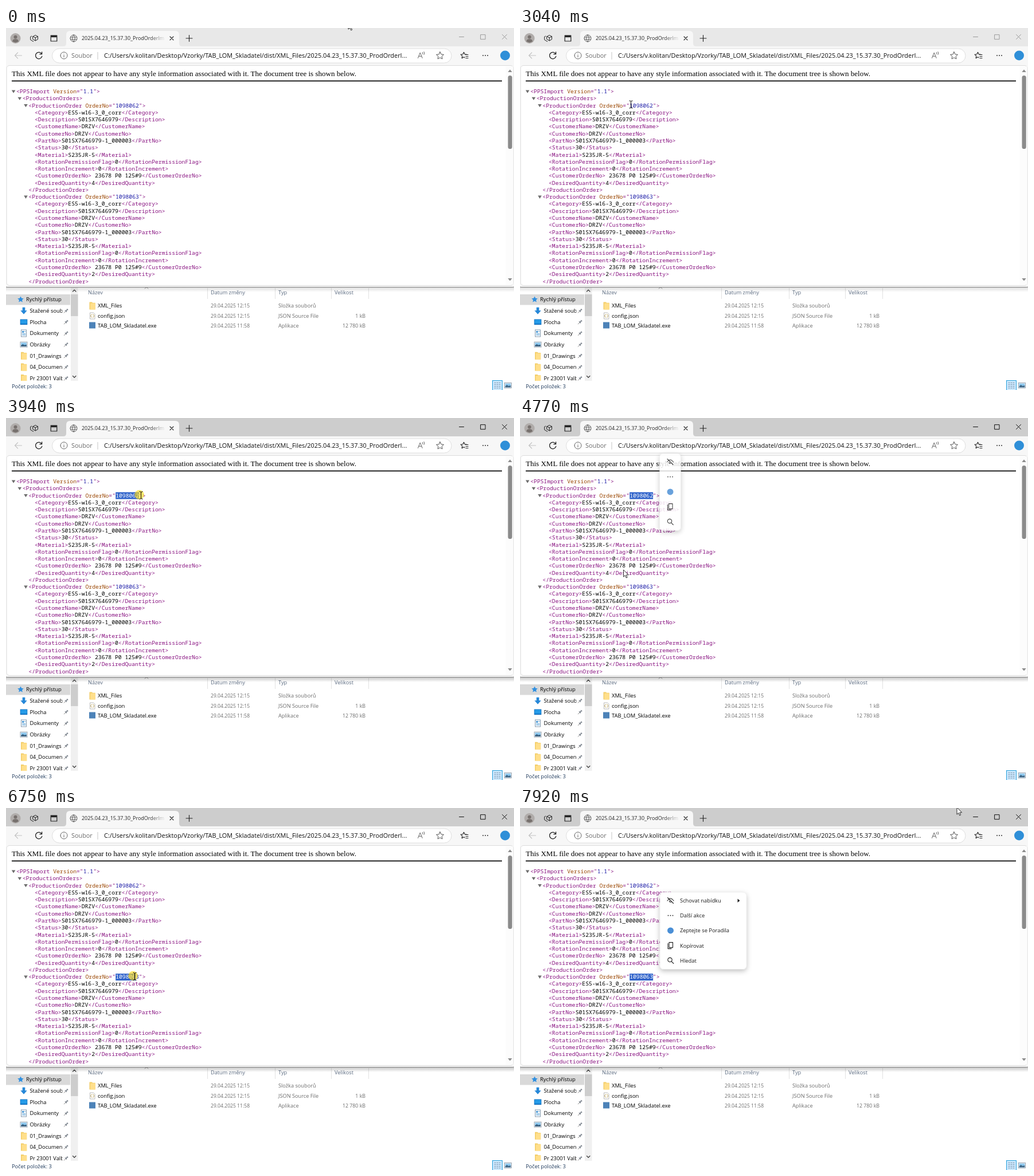
These frames come from a looping animation (886x632 px, 7990 ms). An HTML page:

```html
<!DOCTYPE html>
<html lang="cs">
<head>
<meta charset="utf-8">
<title>Order export</title>
<style>
html, body { margin: 0; width: 100%; height: 100%; overflow: hidden; background: #fff; }
svg { display: block; width: 886px; height: 632px; }
text { white-space: pre; font-family: "Open Sans", "Noto Sans", sans-serif; }
.mono { font-family: "Noto Sans Mono", "Liberation Mono", monospace; font-size: 9.73px; font-weight: 500; }
.serif { font-family: "Liberation Serif", serif; font-size: 13.04px; }
.line { fill: none; stroke: #333; stroke-linecap: round; stroke-linejoin: round; }
</style>
</head>
<body>
<svg id="stage" viewBox="0 0 886 632"></svg>
<script>
const LOOP = 7990, CHAR = 5.84, ROW = 12.28, VALUE_X = 191.2;
const ORDERS = ['1098062', '1098063'];

const rect = (x, y, w, h, fill, extra = '') =>
  `<rect x="${x}" y="${y}" width="${w}" height="${h}" fill="${fill}" ${extra}/>`;
const disc = (x, y, r, fill, extra = '') => `<circle cx="${x}" cy="${y}" r="${r}" fill="${fill}" ${extra}/>`;
const line = (d, color = '#333', width = 1, extra = '') =>
  `<path class="line" d="${d}" style="stroke:${color};stroke-width:${width}" ${extra}/>`;
const shape = (d, fill, extra = '') => `<path d="${d}" fill="${fill}" ${extra}/>`;
const label = (x, y, s, size = 9.3, fill = '#000', extra = '') =>
  `<text x="${x}" y="${y}" font-size="${size}" fill="${fill}" ${extra}>${s}</text>`;
const at = (x, y, content) => `<g transform="translate(${x} ${y})">${content}</g>`;
const star = r => {
  let d = '';
  for (let i = 0; i < 10; i++) {
    const a = i * Math.PI / 5, k = i % 2 ? r * .48 : r;
    d += `${i ? 'L' : 'M'}${(k * Math.sin(a)).toFixed(2)} ${(-k * Math.cos(a)).toFixed(2)}`;
  }
  return d + 'Z';
};
const dots = () => [-4, 0, 4].map(x => disc(x, 0, .9, '#222')).join('');

// XML document
const INK = { tag: '#881280', name: '#994500', value: '#1a1aa6', text: '#000' };
const span = (kind, s) =>
  `<tspan fill="${INK[kind]}">${s.replace(/</g, '&lt;').replace(/>/g, '&gt;')}</tspan>`;
const rowY = row => 114 + row * ROW;
const xmlLine = (row, level, content) =>
  `<text class="mono" x="${18 + level * 10.68}" y="${rowY(row)}">${content}</text>`;
const opening = (tag, attr, value) => span('tag', `<${tag} `) + span('name', attr) +
  span('tag', '="') + span('value', value) + span('tag', '">');
const toggle = (row, level) => {
  const x = 9.8 + level * 10.7, y = rowY(row) - 5.6;
  return shape(`M${x} ${y}h6.6l-3.3 5.4z`, '#6e6e6e');
};

function documentTree() {
  let out = toggle(0, 0) + xmlLine(0, 0, opening('PPSImport', 'Version', '1.1')) +
    toggle(1, 1) + xmlLine(1, 1, span('tag', '<ProductionOrders>'));
  ORDERS.forEach((number, i) => {
    const top = 2 + i * 13;
    const fields = {
      Category: 'ES5-w16-3_0_corr', Description: 'S01SX7646979', CustomerName: 'DRZV',
      CustomerNo: 'DRZV', PartNo: 'S01SX7646979-1_000003', Status: '30', Material: 'S235JR-5',
      RotationPermissionFlag: '0', RotationIncrement: '0',
      CustomerOrderNo: ' 23678 P0 125#9', DesiredQuantity: i ? '2' : '4'
    };
    out += toggle(top, 2) + xmlLine(top, 2, opening('ProductionOrder', 'OrderNo', number));
    Object.entries(fields).forEach(([tag, value], k) => {
      out += xmlLine(top + 1 + k, 3, span('tag', `<${tag}>`) + span('text', value) + span('tag', `</${tag}>`));
    });
    out += xmlLine(top + 12, 2, span('tag', '</ProductionOrder>'));
  });
  return out;
}

// File manager behind the browser
const folder = (x, y) => at(x, y,
  shape('M-5 -6.5h4.5l1 1.3h4.7v11.7h-10.2z', '#f3cd68') + rect(-3.5, -4.5, 8.7, 11, '#ffdf8b'));
const picture = (x, y) => at(x, y, rect(-6, -4.5, 12, 9, '#fff', 'stroke="#7d8b99" stroke-width=".8"') +
  rect(-4.8, -3.3, 9.6, 6.6, '#8cc7ee') + shape('M-4.8 3.3v-2l3-2 3 1.6 3.6-.8v3.2z', '#3b6383'));
const pin = y => at(105, y, line('M-3.6 3.6L-1 1', '#777', .9) +
  shape('M-2.8 -.7L.3 -1.2 1.6 -3.8 3.8 -1.6 1.2 -.3 .7 2.8z', '#808891'));

function fileManager() {
  let out = rect(0, 450, 886, 182, '#fff') + rect(0, 465, 112, 18.5, '#d9d9d9') +
    rect(113, 453, 12.5, 163, '#f0f0f0') + rect(113, 465, 12.5, 38, '#cdcdcd') +
    line('M116.5 460l2.7-2.7 2.7 2.7M116.5 607.5l2.7 2.7 2.7-2.7', '#444', 1.3);
  for (const x of [351.5, 469.5, 567.5, 632.5]) out += rect(x - .5, 454, 1, 19, '#e2e2e2');
  out += line('M242 455l3-2.5 3 2.5', '#888', .8);
  [[143, 'Název'], [357, 'Datum změny'], [475, 'Typ'], [573, 'Velikost']]
    .forEach(([x, s]) => out += label(x, 465.2, s, 9.2, '#5b6b80'));

  const places = ['Rychlý přístup', 'Stažené soub', 'Plocha', 'Dokumenty', 'Obrázky',
    '01_Drawings', '04_Documen', 'Pr 23001 Valb'];
  const icons = [
    y => at(25.5, y, shape(star(5.6), '#2f8fe0')),
    y => at(31, y, shape('M-2.3 -6h4.6v5.5h3.4L0 6 -5.7 -.5h3.4z', '#2788d8')),
    y => at(31, y, rect(-6.3, -4.8, 12.6, 9.6, '#0f6cbd') + rect(-5.5, -4, 11, 7, '#259be8')),
    y => at(31, y, rect(-4.5, -6, 9, 12, '#fff', 'stroke="#7890a5" stroke-width=".9"') +
      rect(-2.8, -4, 3, 3, '#3a8fd0') + line('M1.5 -3h1.5M-2.5 .8h5.5M-2.5 3h5.5', '#3a8fd0', .9)),
    y => picture(31, y)
  ];
  out += '<g clip-path="url(#side)">';
  places.forEach((name, i) => {
    const y = 474 + i * 19.65;
    out += (icons[i] || (v => folder(31, v)))(y);
    out += label(i ? 41.5 : 35, y + 3.4, name, i ? 9.3 : 9.45, '#000', i ? 'clip-path="url(#names)"' : '');
    if (i) out += pin(y);
  });
  out += '</g>';

  const files = [
    ['XML_Files', '12:15', 'Složka souborů', ''],
    ['config.json', '12:15', 'JSON Source File', '1 kB'],
    ['TAB_LOM_Skladatel.exe', '11:58', 'Aplikace', '12 780 kB']
  ];
  files.forEach(([name, time, type, size], i) => {
    const y = 488.4 + i * 17.3;
    out += label(160, y, name, 9.4) + label(357, y, '29.04.2025 ' + time, 8.6, '#6d6d6d') +
      label(475, y, type, 9.2, '#6d6d6d') + label(627, y, size, 8.8, '#6d6d6d', 'text-anchor="end"');
  });
  out += folder(150.5, 485) +
    at(150.5, 502.5, shape('M-4 -5.5h6l2.5 2.5v8.5h-8.5z', '#fff', 'stroke="#aaa" stroke-width=".8"') +
      line('M-.8 -2.5q-1.4 0 -1.4 1.3t-1 1.3q1 0 1 1.3t1.4 1.3M1.2 -2.5q1.4 0 1.4 1.3t.8 1.3q-.8 0 -.8 1.3t-1.4 1.3', '#b59a4a', .8)) +
    rect(145, 513.5, 11, 11, '#4d83b8');
  out += rect(0, 616, 886, 16, '#fff') + label(10, 628.8, 'Počet položek: 3', 9.23, '#1e395b');
  out += rect(848.5, 615.5, 17, 17, '#cce8ff', 'stroke="#26a0da"');
  for (let y = 619.5; y < 630; y += 3)
    out += line(`M852 ${y}h2M856 ${y}h2M860 ${y}h2`, '#6d8598', .9);
  return out + picture(875.5, 624);
}

// Browser window
function browser() {
  let out = rect(-4, -8, 894, 460.5, '#f7f7f7', 'rx="6" stroke="#808080" stroke-width="1"') +
    rect(0, 0, 886, 32, '#e8e8e8', 'id="titlebar"') +
    shape('M100 32q5 0 5-5V12q0-7 7-7h183q7 0 7 7v15q0 5 5 5z', '#f7f7f7');
  out += at(16.5, 18, disc(0, 0, 9, '#b0acaa') + disc(0, -2.3, 3, '#77716e') +
    shape('M-5.3 5.6q0-4.4 5.3-4.4t5.3 4.4q-5 3.6-10.6 0z', '#77716e'));
  out += at(49, 18, line('M-2 -3.2l4.2-2.3 4.3 2.3v5l-4.3 2.4-4.2-2.4zM-2 -3.2l4.2 2.2 4.3-2.2M2.2 -1v5', '#222', 1) +
    line('M-4.3 -3.8l-2 1.1v5.3l5 3', '#222', 1));
  out += at(83.5, 18, line('M-5.3 -5h10.6v10h-10.6z', '#222', 1.2) + rect(-5, -5, 10, 3.2, '#222'));
  out += at(118, 18, line('M-6 0a6 6 0 1 0 12 0a6 6 0 1 0 -12 0M-5.5 -2h11M-5.5 2h11M0 -6q-5 6 0 12M0 -6q5 6 0 12', '#555', .9));
  out += label(132, 21.3, '2025.04.23_15.37.30_ProdOrderIm', 8.95, 'url(#fade)', 'clip-path="url(#tab)"');
  out += line('M286 15l6 6M292 15l-6 6', '#222', 1.1) + line('M314 18h11M319.5 12.5v11', '#222', 1.1);
  out += '<g id="controls" class="line">' +
    '<path d="M790.5 15.5h8M828 11.7h8v8h-8zM865.5 11.5l8 8M873.5 11.5l-8 8"/></g>';

  out += rect(80.5, 36, 696.5, 25, '#fff', 'rx="12.5" stroke="#dedede"') +
    line('M27.5 48h-12M20.5 43l-5 5 5 5', '#c4c4c4', 1.2) +
    line('M62.2 45.2a5.7 5.7 0 1 0 .6 4.2M62.6 42v3.7h-3.7', '#222', 1.3) +
    line('M95 48a6 6 0 1 0 12 0a6 6 0 1 0 -12 0M101 47.5v3.4M101 45.1v.2', '#666', 1) +
    label(114, 52, 'Soubor', 10.85, '#6a6a6a') + rect(159.5, 42, 1, 13, '#c5c5c5') +
    label(171, 52, 'C:/Users/v.kolitan/Desktop/Vzorky/TAB_LOM_Skladatel/dist/XML_Files/2025.04.23_15.37.30_ProdOrderI...', 10.88, '#111');
  out += line('M718.5 52.5l3.8-9.5 3.8 9.5M720 49.3h4.7M726.5 42.5q1.2 1.5 0 3M729 41.5q2 2.5 0 5', '#666', 1);
  out += at(757, 48.5, line(star(6.8), '#555', 1)) +
    at(798.5, 48, line(star(5.8), '#222', 1.1) + rect(2, -1, 7, 7, '#f7f7f7') +
      line('M2.5 -1.5h5M3.5 1.5h4M3.5 4.5h4', '#222', 1.1)) +
    at(836, 48, dots()) + disc(870.5, 48, 8.5, '#2f8fd8');

  out += rect(1, 65.5, 884, 384, '#fff', 'rx="5" stroke="#dcdcdc"') +
    rect(871.5, 67, 13, 381, '#fcfcfc') + rect(875.5, 83, 7.2, 128, '#8b8b8b', 'rx="3.6"') +
    shape('M875.3 77l3.7-4.6 3.7 4.6zM875.3 437l3.7 4.6 3.7-4.6z', '#8b8b8b') +
    `<text class="serif" x="10" y="84">This XML file does not appear to have any style information associated with it. The document tree is shown below.</text>` +
    rect(10, 91.6, 855, 1.7, '#000');
  return out + documentTree();
}

const MENU = ['Schovat nabídku', 'Další akce', 'Zeptejte se Poradila', 'Kopírovat', 'Hledat'];
const MENU_ICONS = [
  line('M-5.5 .5q5.5-8 11 0M-5 -5l10 10M-2 .5a2 2 0 0 0 3 2', '#222', 1.1),
  dots(),
  disc(0, 0, 5.5, '#4a8fd6'),
  line('M-2.5 -5.5h6.5v9h-6.5zM-4.5 -3.5v9h6', '#222', 1.1),
  line('M-4.7 -1.2a3.7 3.7 0 1 0 7.4 0a3.7 3.7 0 1 0 -7.4 0M1.7 1.6l3.6 3.6', '#222', 1.1)
];
const menu = () => '<g id="menu">' +
  rect(0, 0, 37, 134.5, '#fff', 'id="panel" rx="6" filter="url(#soft)" stroke="#e4e4e4" stroke-width=".6"') +
  MENU_ICONS.map((icon, i) => at(18.5, 14.5 + i * 26.2, icon)).join('') +
  '<g id="labels">' + MENU.map((s, i) => label(35, 18 + i * 26.2, s, 9.35, '#1a1a1a')).join('') +
  shape('M135.5 11.5l4 3.2-4 3.2z', '#222') + '</g></g>';

const selection = i => `<g id="sel${i}">${rect(VALUE_X, rowY(2 + i * 13) - 9, 0, 12, '#3164cb')}` +
  `<text class="mono" x="${VALUE_X}" y="${rowY(2 + i * 13)}" fill="#fff"></text></g>`;

const clip = (id, x, y, w, h) => `<clipPath id="${id}">${rect(x, y, w, h, '#000')}</clipPath>`;
document.getElementById('stage').innerHTML = `<defs>
  ${clip('side', 0, 454, 112, 162)}${clip('names', 38, 454, 60.5, 162)}${clip('tab', 130, 8, 147, 20)}
  <linearGradient id="fade" gradientUnits="userSpaceOnUse" x1="250" x2="278" y1="0" y2="0">
    <stop stop-color="#222"/><stop offset="1" stop-color="#222" stop-opacity=".05"/></linearGradient>
  <linearGradient id="under" x2="0" y2="1"><stop stop-opacity=".22"/><stop offset="1" stop-opacity="0"/></linearGradient>
  <filter id="soft" x="-60%" y="-30%" width="220%" height="160%">
    <feDropShadow dx="0" dy="3" stdDeviation="4" flood-opacity=".25"/></filter></defs>` +
  fileManager() + rect(0, 453, 886, 8, 'url(#under)', 'id="shadow"') + browser() +
  selection(0) + selection(1) + menu() + disc(0, 0, 8.3, '#ffdc14', 'id="press" opacity=".62"') +
  shape('M0 0V12.2L2.8 9.6 4.7 14 6.6 13.2 4.8 8.9H8.7Z', '#fff', 'id="arrow" stroke="#000" stroke-width=".8"') +
  line('M-2.5 -6.5Q0 -6.5 0 -5.2V5.2Q0 6.5 -2.5 6.5M2.5 -6.5Q0 -6.5 0 -5.2M0 5.2Q0 6.5 2.5 6.5', '#000', 1, 'id="beam"');

// Motion: keyframes are [time, ...values]
const PATH = [
  [1085, 597, -10], [1300, 510, 45], [1480, 355, 118], [1640, 255, 157], [1760, 226, 156], [1880, 220.5, 139],
  [1930, 220.5, 139], [2160, 215, 137], [2330, 215, 137], [2570, 186, 135],
  [2750, 186, 135], [2840, 191, 134], [3010, 191, 134], [3040, 193.5, 133.5],
  [3330, 193.5, 133.5], [3940, 235.5, 135],
  [4190, 235.5, 135], [4350, 229, 152], [4560, 203, 220], [4770, 180.5, 265], [4980, 185, 275],
  [5030, 185, 275], [5680, 193, 293], [5810, 191, 294.5], [5880, 191.5, 295],
  [6440, 191.5, 295], [6750, 224.5, 294], [6960, 235, 294],
  [7340, 235, 294], [7500, 290, 248], [7640, 420, 155], [7780, 620, 50], [7920, 762, -1]
];
const MENU_ALPHA = [[4250, 0], [4420, .95], [4770, .83], [5050, .74], [5680, .47], [5860, .4], [5890, 0],
  [7390, 0], [7530, 1]];

function sample(keys, t) {
  const i = keys.findIndex(k => k[0] > t);
  if (i === 0) return keys[0].slice(1);
  if (i < 0) return keys[keys.length - 1].slice(1);
  const a = keys[i - 1], b = keys[i], u = (t - a[0]) / (b[0] - a[0]);
  return a.slice(1).map((v, k) => v + (b[k + 1] - v) * u);
}
const within = (t, from, to) => t >= from && t < to;
const get = id => document.getElementById(id);
const show = (id, on) => get(id).setAttribute('visibility', on ? 'visible' : 'hidden');
const move = (id, x, y) => get(id).setAttribute('transform', `translate(${x} ${y})`);

function select(i, count) {
  const [box, text] = get('sel' + i).children;
  box.setAttribute('width', count * CHAR);
  text.textContent = ORDERS[i].slice(0, count);
}

function render(t) {
  const [x, y] = sample(PATH, t);
  const beam = within(t, 1700, 4300) || within(t, 5880, 7400);
  show('beam', beam);
  show('arrow', !beam);
  move(beam ? 'beam' : 'arrow', x, y);
  show('press', within(t, 3330, 4210) || within(t, 5880, 7360));
  move('press', x - 3, y - 1);

  const dragged = Math.max(0, Math.min(7, Math.round((x - VALUE_X) / CHAR)));
  select(0, within(t, 3330, 5880) ? (t < 4000 ? dragged : 7) : 0);
  select(1, t >= 6440 ? (t < 7000 ? dragged : 7) : 0);

  const active = t >= 3330, second = t > 6000, wide = t >= 7570;
  get('titlebar').setAttribute('fill', active ? '#cdcdcd' : '#e8e8e8');
  get('controls').style.stroke = active ? '#111' : '#9a9a9a';
  get('shadow').setAttribute('opacity', active ? 1 : .6);
  get('menu').setAttribute('opacity', sample(MENU_ALPHA, t)[0]);
  move('menu', second ? 244 : 243.5, second ? 147 : 62);
  get('panel').setAttribute('width', wide ? 151 : 37);
  show('labels', wide);
}

function tick() {
  render(performance.now() % LOOP);
  requestAnimationFrame(tick);
}
tick();
</script>
</body>
</html>
```
